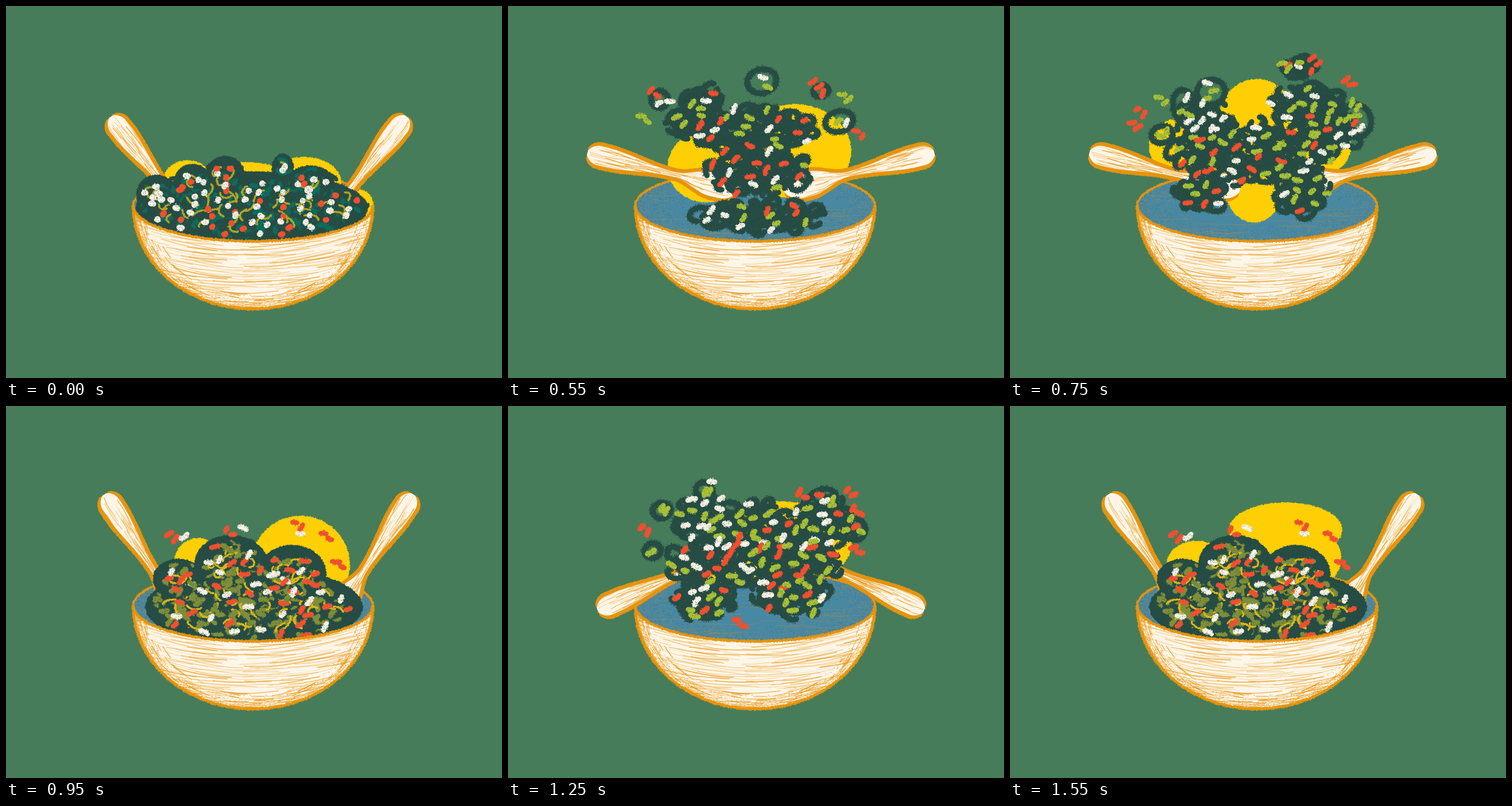
These frames come from a looping animation (864 by 648 pixels, 1.65 s). An HTML page with a canvas:

```html
<!DOCTYPE html>
<html lang="en">
<head>
<meta charset="utf-8">
<title>Tossed salad</title>
<style>
html, body { margin: 0; width: 100%; height: 100%; overflow: hidden; background: #467c59; }
canvas { display: block; width: 864px; height: 648px; }
</style>
</head>
<body>
<canvas id="stage" width="864" height="648"></canvas>
<script>
const W = 864, H = 648, LOOP = 1650, TAU = Math.PI * 2;
const BG = '#467c59', ORANGE = '#e5940f', CREAM = '#fdf6e8', YELLOW = '#ffcf05', BLUE = '#4788a3',
      DARK = '#264c44', RED = '#ef5030', WHITE = '#f7f2e4', LIME = '#a9c136', OLIVE = '#7f8e38', TEAL = '#0f6b5d';
const BOWL = { x: 430.5, y: 348, rx: 209, ry: 62, depth: 180 };

let g, seed = 1;
const rnd = () => {
  seed = (seed + 0x6D2B79F5) | 0;
  let t = Math.imul(seed ^ (seed >>> 15), 1 | seed);
  t = (t + Math.imul(t ^ (t >>> 7), 61 | t)) ^ t;
  return ((t ^ (t >>> 14)) >>> 0) / 4294967296;
};
const range = (a, b) => a + (b - a) * rnd();
const pick = list => list[Math.floor(rnd() * list.length)];

// A crayon stroke: solid core with a grainy fringe.
function crayon(pts, w, color) {
  g.strokeStyle = g.fillStyle = color;
  g.lineWidth = w * 0.84;
  g.lineCap = g.lineJoin = 'round';
  g.beginPath();
  pts.forEach(p => g.lineTo(...p));
  g.stroke();
  for (let i = 1; i < pts.length; i++) {
    const [x, y] = pts[i - 1], dx = pts[i][0] - x, dy = pts[i][1] - y;
    const len = Math.hypot(dx, dy) || 1;
    for (let k = 0; k < len * 1.3; k++) {
      const t = rnd(), o = pick([-1, 1]) * w * range(0.34, 0.6) / len, s = range(0.8, 1.9);
      g.fillRect(x + dx * t - dy * o - s / 2, y + dy * t + dx * o - s / 2, s, s);
    }
  }
}

function arc(x, y, rx, ry, rot = 0, from = 0, to = TAU) {
  const c = Math.cos(rot), s = Math.sin(rot);
  return Array.from({ length: 29 }, (_, i) => {
    const a = from + (to - from) * i / 28, u = Math.cos(a) * rx, v = Math.sin(a) * ry;
    return [x + u * c - v * s, y + u * s + v * c];
  });
}

function patch(ellipse, color) {
  const pts = arc(...ellipse);
  g.fillStyle = color;
  g.beginPath();
  pts.forEach(p => g.lineTo(...p));
  g.fill();
  crayon(pts, 4, color);
}

function speckle(n, place, color, alpha) {
  g.save();
  g.fillStyle = color;
  g.globalAlpha = alpha;
  for (let i = 0; i < n; i++) g.fillRect(...place(), range(0.8, 1.8), range(0.8, 1.6));
  g.restore();
}

// Point near the border of an ellipse.
function nearEdge(rx, ry, depth, end) {
  const a = range(0, end), r = 1 - rnd() * rnd() * depth;
  return [BOWL.x + Math.cos(a) * rx * r, BOWL.y + Math.sin(a) * ry * r];
}

function bowlBack() {
  const { x, y, rx, ry } = BOWL;
  g.save();
  g.beginPath();
  g.ellipse(x, y, rx, ry, 0, 0, TAU);
  g.fillStyle = BLUE;
  g.fill();
  g.clip();
  const edge = () => nearEdge(rx, ry, 0.5, TAU);
  speckle(2600, edge, '#a58a52', 0.5);
  speckle(1200, edge, '#2f7391', 0.5);
  g.strokeStyle = '#b08a45';
  g.lineWidth = 0.8;
  g.globalAlpha = 0.55;
  for (let i = 0; i < 40; i++) {
    const px = range(230, 590), py = range(300, 405), len = range(25, 90);
    g.beginPath();
    g.moveTo(px, py);
    g.quadraticCurveTo(px + len / 2, py + range(-3, 5), px + len, py + range(-4, 4));
    g.stroke();
  }
  g.restore();
  crayon(arc(x, y, rx, ry, 0, Math.PI, TAU), 3.5, ORANGE);
}

function bowlFront() {
  const { x, y, rx, ry, depth } = BOWL;
  g.save();
  g.beginPath();
  g.ellipse(x, y, rx, depth, 0, 0, Math.PI);
  g.ellipse(x, y, rx, ry, 0, Math.PI, 0, true);
  g.fillStyle = CREAM;
  g.fill();
  g.clip();
  g.strokeStyle = ORANGE;
  for (let y0 = 335; y0 < 525; y0 += 2) {
    const end = range(520, 650), phase = rnd() * TAU;
    for (let px = range(215, 330), len; px < end; px += len + range(10, 110)) {
      len = range(50, 190);
      g.globalAlpha = range(0.3, 0.85);
      g.lineWidth = range(0.5, 1.4);
      g.beginPath();
      for (let q = px; q < px + len; q += 6) {
        const u = (q - x) / rx;
        g.lineTo(q, y0 + 36 * (1 - u * u) + Math.sin(q / 26 + phase) * 1.7);
      }
      g.stroke();
    }
  }
  // Strokes that hug the outer wall, denser on the left.
  for (let i = 0; i < 260; i++) {
    const a = Math.PI * (1 - rnd() ** 1.5), r = 1 - rnd() * rnd() * 0.17;
    g.globalAlpha = range(0.3, 0.8);
    g.lineWidth = range(0.6, 1.7);
    g.beginPath();
    g.ellipse(x, y, rx * r, depth * r, 0, a, Math.min(a + range(0.05, 0.2), Math.PI));
    g.stroke();
  }
  g.globalAlpha = 1;
  speckle(1400, () => nearEdge(rx, depth, 0.15, Math.PI), ORANGE, 0.7);
  g.restore();
  crayon(arc(x, y, rx, depth, 0, 0, Math.PI), 4.5, ORANGE);
  crayon(arc(x, y, rx, ry, 0, 0, Math.PI), 4.5, ORANGE);
}

// Half width of a spoon at a distance u from the tip of its handle.
function spoonWidth(u) {
  const ease = k => k * k * (3 - 2 * k), clamp = k => Math.max(0, Math.min(1, k));
  const cap = Math.sqrt(1 - (1 - clamp(u / 24)) ** 2);
  const handle = 23.5 - 12.5 * ease(clamp((u - 35) / 120));
  const head = 17 * ease(clamp((u - 160) / 65));
  const end = Math.sqrt(1 - clamp((u - 240) / 35) ** 2);
  return (handle + head) * cap * end;
}

function spoonPath(inset) {
  const edge = [];
  for (let u = 0; u <= 275; u += 2.5) edge.push([u, Math.max(0, spoonWidth(u) - inset)]);
  const pts = [...edge, ...edge.map(([u, h]) => [u, -h]).reverse()];
  g.beginPath();
  pts.filter(p => p[1]).forEach(p => g.lineTo(...p));
  g.closePath();
}

function spoon([x, y, deg]) {
  g.save();
  g.translate(x, y);
  g.rotate(deg * Math.PI / 180);
  spoonPath(0);
  g.fillStyle = ORANGE;
  g.fill();
  speckle(500, () => {
    const u = range(0, 250);
    return [u, pick([-1, 1]) * spoonWidth(u) - 0.5];
  }, ORANGE, 1);
  spoonPath(6.5);
  g.fillStyle = CREAM;
  g.fill();
  g.clip();
  g.strokeStyle = ORANGE;
  for (let i = 0; i < 75; i++) {
    const u = range(2, 210), len = range(25, 70), v = range(-0.8, 0.8);
    g.globalAlpha = range(0.3, 0.85);
    g.lineWidth = range(0.5, 1.3);
    g.beginPath();
    for (let s = u; s < u + len; s += 5) g.lineTo(s, v * spoonWidth(s) + Math.sin(s / 12 + i));
    g.stroke();
  }
  g.restore();
}

function spoons([left, right = left]) {
  spoon(left);
  g.save();
  g.translate(881, 0);
  g.scale(-1, 1);
  spoon(right);
  g.restore();
}

// Tip x, tip y and angle; the right spoon mirrors the left unless given.
const SPOON = {
  rest: [[181, 191, 52]],
  high: [[170, 152, 57]],
  tilt: [[170, 180, 40], [169, 210, 33]],
  flat: [[136, 255, 14]],
  low: [[154, 357, -24]]
};

const SUN = {
  rest: [[316, 304, 40, 33], [415, 312, 90, 38], [520, 308, 62, 43], [618, 345, 19, 22]],
  high: [[513, 277, 84, 84], [335, 272, 40, 40]],
  lift: [[500, 253, 96, 80], [345, 280, 65, 60]],
  air: [[430, 202, 66, 73], [300, 245, 56, 48], [425, 318, 48, 57], [532, 245, 60, 50]],
  fall: [[475, 240, 122, 72], [345, 290, 40, 44]],
  land: [[480, 216, 97, 46], [325, 275, 50, 38], [520, 265, 55, 50], [430, 390, 60, 24]]
};

// Each heap is a few ellipses; gap is the area one chip takes up.
const FOOD = {
  rest: {
    blobs: [[428, 352, 201, 62], [262, 328, 33, 32], [325, 305, 30, 28], [382, 295, 32, 32], [482, 282, 17, 23], [530, 308, 40, 28]],
    solid: true, fill: TEAL, mix: [RED, WHITE, WHITE], gap: 640, len: 15, w: 11, wisp: '#b7a522'
  },
  high: {
    blobs: [[432, 350, 188, 68], [392, 275, 62, 48], [498, 292, 58, 48], [300, 302, 42, 34]],
    solid: true, fill: OLIVE, mix: [RED, WHITE, OLIVE], gap: 780, len: 21, w: 9, wisp: '#dcb81a',
    sparks: [[289, 227, RED], [315, 231, WHITE], [389, 219, RED], [418, 217, WHITE], [508, 207, RED], [518, 226, WHITE], [558, 226, RED], [580, 275, RED]]
  },
  lift: {
    blobs: [[442, 131, 31, 26], [338, 165, 45, 32], [264, 163, 20, 20], [577, 201, 30, 23], [545, 148, 19, 15],
      [425, 215, 125, 53], [325, 205, 56, 38], [436, 288, 104, 52], [438, 367, 128, 36]],
    mix: [RED, WHITE, LIME], gap: 1150, len: 21, w: 9,
    sparks: [[254, 151, RED], [287, 170, WHITE], [237, 196, LIME], [536, 135, RED], [587, 158, LIME], [611, 222, RED]]
  },
  air: {
    blobs: [[350, 150, 30, 27], [305, 178, 25, 38], [265, 224, 24, 20], [507, 106, 40, 26], [603, 200, 31, 34],
      [515, 172, 72, 45], [340, 205, 55, 48], [555, 220, 60, 48], [425, 255, 155, 62], [332, 325, 52, 44], [508, 325, 56, 50]],
    mix: [RED, WHITE, LIME, LIME], gap: 900, len: 21, w: 9,
    sparks: [[227, 184, RED], [217, 207, RED], [264, 163, LIME], [590, 132, RED], [531, 95, RED], [479, 105, LIME], [600, 172, LIME]]
  },
  fall: {
    blobs: [[268, 182, 21, 19], [342, 150, 20, 23], [252, 252, 20, 18], [548, 162, 30, 22], [605, 215, 23, 24],
      [335, 195, 58, 48], [425, 215, 90, 58], [545, 205, 70, 55], [430, 270, 165, 62], [340, 338, 62, 44], [495, 330, 75, 46]],
    mix: [RED, WHITE, LIME, LIME], gap: 800, len: 22, w: 10,
    sparks: [[238, 215, RED], [360, 136, WHITE], [376, 165, WHITE], [512, 154, RED], [596, 150, RED], [606, 182, RED], [607, 250, RED], [403, 377, RED]]
  }
};

// Spread items evenly over an ellipse along a sunflower spiral.
function spread([x, y, rx, ry], area, draw, pad = 9) {
  const n = Math.max(1, Math.round(Math.PI * rx * ry / area)), turn = rnd() * TAU;
  for (let i = 0; i < n; i++) {
    const r = Math.sqrt((i + 0.3) / n), a = turn + i * 2.4;
    draw(x + Math.cos(a) * r * (rx - pad) + range(-4, 4), y + Math.sin(a) * r * (ry - pad) + range(-4, 4));
  }
}

function curl(x, y, w, color, size, turn) {
  const from = rnd() * TAU;
  crayon(arc(x, y, size, size * range(0.5, 0.75), range(-1, 1), from, from + turn), w, color);
}

function chip(x, y, color, { len, w }) {
  const angle = range(-1.3, 0.6), c = Math.cos(angle), s = Math.sin(angle);
  const half = (len * range(0.8, 1.1) - w) / 2, bend = range(-2, 2);
  crayon([[x - c * half, y - s * half], [x - s * bend, y + c * bend], [x + c * half, y + s * half]], w, color);
  if (color !== RED) speckle(12, () => {
    const t = range(-1, 1) * (half + 3), o = range(-0.5, 0.5) * w;
    return [x + c * t - s * o, y + s * t + c * o];
  }, DARK, 0.4);
}

function food(f) {
  if (f.solid) {
    f.blobs.forEach(b => patch(b, DARK));
    f.blobs.forEach(b => {
      spread(b, 420, (x, y) => curl(x, y, 8, f.fill, range(8, 16), 1.8), 17);
      spread(b, 900, (x, y) => curl(x, y, 7, DARK, range(12, 20), 4));
      spread(b, 1100, (x, y) => curl(x, y, 2.4, f.wisp, range(9, 20), 2), 26);
    });
  } else {
    f.blobs.forEach(b => b[2] < 32
      ? crayon(arc(b[0], b[1], b[2] - 5, b[3] - 5, -0.25), 11, DARK)
      : spread(b, 430, (x, y) => curl(x, y, 11, DARK, range(12, 20), 5.2), 16));
  }
  f.blobs.forEach(b => spread(b, f.gap, (x, y) => chip(x, y, pick(f.mix), f), 12));
  (f.sparks || []).forEach(([x, y, color]) => {
    chip(x - 5, y - 4, color, f);
    if (color !== WHITE) chip(x + 6, y + 5, color, f);
  });
}

// Food, spoons, sun and an optional drop. The first pose holds; the rest last 100 ms each.
const POSES = [
  ['rest', 'rest', 'rest'],
  ['high', 'high', 'high'],
  ['lift', 'tilt', 'lift', 28],
  ['lift', 'flat', 'lift'],
  ['fall', 'flat', 'fall'],
  ['air', 'flat', 'air'],
  ['fall', 'flat', 'fall'],
  ['high', 'high', 'high'],
  ['lift', 'tilt', 'lift'],
  ['fall', 'flat', 'fall'],
  ['fall', 'low', 'fall'],
  ['air', 'flat', 'air'],
  ['fall', 'tilt', 'fall'],
  ['high', 'high', 'land']
];
const HOLD = 350, STEP = 100;

function layer(draw, s) {
  const c = document.createElement('canvas');
  c.width = W;
  c.height = H;
  g = c.getContext('2d');
  seed = s;
  draw();
  return c;
}

const bake = (set, draw) =>
  Object.fromEntries(Object.entries(set).map(([name, item], i) => [name, layer(() => draw(item), 40 + i * 17)]));

const back = layer(bowlBack, 5);
const front = layer(bowlFront, 9);
const foods = bake(FOOD, food);
const tools = bake(SPOON, spoons);
const suns = bake(SUN, list => list.forEach(e => patch(e, YELLOW)));

const view = document.getElementById('stage').getContext('2d');

function render(t) {
  const i = t < HOLD ? 0 : 1 + Math.floor((t - HOLD) / STEP);
  const [dish, tool, sun, drop = 0] = POSES[Math.min(i, POSES.length - 1)];
  view.fillStyle = BG;
  view.fillRect(0, 0, W, H);
  view.drawImage(back, 0, 0);
  view.drawImage(suns[sun], 0, drop);
  view.drawImage(tools[tool], 0, 0);
  view.drawImage(foods[dish], 0, drop);
  view.drawImage(front, 0, 0);
}

const start = performance.now();
function tick() {
  render((performance.now() - start) % LOOP);
  requestAnimationFrame(tick);
}
tick();
</script>
</body>
</html>
```
